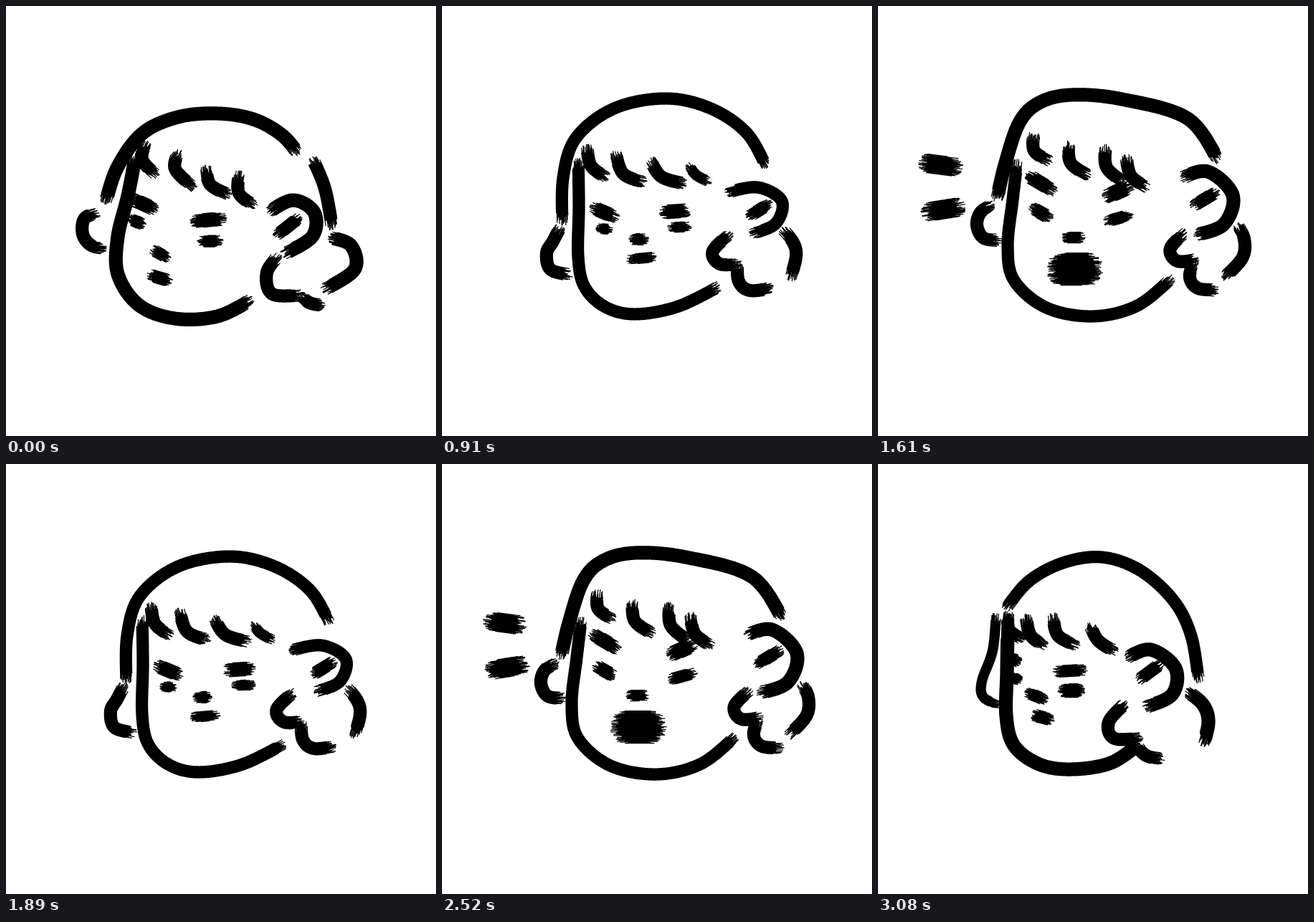
Animation of 600x600 px, one loop 3150 ms. Source, as an HTML page with a canvas:

```html
<!DOCTYPE html>
<html lang="en">
<head>
<meta charset="utf-8">
<title>Shouting girl</title>
<style>
html, body { margin: 0; width: 100%; height: 100%; overflow: hidden; background: #fff; }
canvas { display: block; }
</style>
</head>
<body>
<canvas id="stage" width="600" height="600"></canvas>
<script>
const TICK = 70, TICKS = 45;
const ctx = document.getElementById('stage').getContext('2d');

// Column order of the poses in every part
const TURN = 0, SHOUT = 1, LEAN = 2, REST = 3, WIND = 4, CLOSE = 5, AWAY = 6;

// One brush stroke: its usual width, then its points in each pose.
// An odd count of numbers starts with a width for that pose alone.
const part = (width, ...poses) => poses.map(text => {
  const pts = text.split(' ').map(Number);
  const w = pts.length % 2 ? pts.shift() : width;
  return { w, pts };
});

const parts = [
  // crown of hair
  part(19,
    '138 278 155 226 190 178 240 155 295 150 345 158 385 180 410 209',
    '165 274 177 222 197 163 225 135 270 124 340 130 432 157 477 219',
    '141 305 152 240 192 170 245 143 295 138 355 152 446 192 483 259',
    '17 168 308 169 240 187 184 240 143 312 129 375 143 425 177 454 227',
    '21 143 308 150 235 183 183 230 147 290 138 370 148 460 192 490 256',
    '17 163 303 170 222 205 160 255 134 315 132 375 156 425 193 458 241',
    '17 176 205 210 164 258 138 312 130 365 148 412 190 437 240 448 307'),
  // back of hair
  part(0,
    '18 426 209 445 255 456 314', '476 217 480 240 484 260', '482 257 486 270 488 285',
    '453 224 456 240 458 260', '489 254 490 265 490 280', '457 240 460 250 462 262',
    '437 240 445 270 448 305'),
  // lock behind the cheek
  part(18,
    '132 288 110 296 107 318 119 334 141 338',
    '164 276 144 287 138 306 148 324 174 327',
    '141 298 130 318 127 338 135 352 153 358',
    '167 305 155 328 146 345 152 368 184 376',
    '143 295 143 312 126 330 119 345 127 364',
    '17 163 298 153 315 147 330 152 349 174 356',
    '14 165 207 160 260 145 303 147 325 171 338'),
  // face
  part(19,
    '182 203 170 265 156 322 156 374 185 417 235 436 295 433 346 408',
    '17 195 212 188 270 181 335 190 383 235 421 300 433 362 418 413 377',
    '192 215 176 262 176 320 158 368 178 422 230 449 300 448 376 421',
    '17 190 210 191 280 190 350 199 392 228 420 270 430 330 419 391 389',
    '191 210 174 270 168 328 155 385 182 432 240 454 315 452 388 412',
    '17 197 220 190 285 187 350 203 397 245 425 300 432 352 418 397 387',
    '181 223 180 290 179 352 190 393 225 419 270 426 325 417 368 388'),
  // fringe
  part(18,
    '197 187 190 214 213 239', '218 174 218 202 244 219', '225 183 213 209 229 234',
    '202 192 208 223 234 242', '226 182 219 206 226 230', '220 183 216 213 241 231',
    '182 204 183 231 206 247'),
  part(18,
    '243 200 236 227 265 256', '266 187 269 219 298 239', '263 210 259 236 281 255',
    '241 200 253 234 287 247', '16 259 215 261 236 273 254', '250 193 256 232 294 244',
    '206 208 213 239 237 256'),
  part(18,
    '279 221 285 249 315 265', '318 192 319 225 347 249', '322 221 314 246 338 269',
    '289 211 306 238 343 249', '316 221 307 244 330 268', '301 203 305 232 332 245',
    '244 207 251 239 282 255'),
  part(18,
    '326 229 325 261 350 281', '346 206 353 237 380 256', '345 231 352 259 381 269',
    '15 342 219 355 236 377 247', '346 230 352 257 382 270', '341 220 353 247 379 257',
    '294 219 307 246 335 264'),
  // brows
  part(20, '171 267 213 286', '205 234 250 261', '198 270 243 298', '205 279 248 297',
    '22 199 275 249 298', '22 202 265 250 287', '18 178 268 201 278'),
  part(20, '256 301 309 296', '22 313 269 357 249', '305 299 356 284', '302 288 349 285',
    '21 303 301 358 279', '23 297 290 358 275', '17 243 290 293 287'),
  // eyes
  part(18, '170 295 195 307', '19 210 279 244 298', '196 316 239 327', '15 214 310 239 312',
    '20 195 317 236 323', '20 207 310 245 311', '16 181 296 202 303'),
  part(17, '266 328 304 328', '314 302 357 290', '18 316 328 355 322', '15 314 309 349 308',
    '20 304 325 348 319', '20 311 316 351 314', '20 250 316 290 316'),
  // nose
  part(17, '201 338 230 354', '16 255 323 290 323', '246 349 278 366', '260 326 289 325',
    '242 350 280 360', '256 326 288 326', '204 317 238 331'),
  // mouth
  part(20, '18 196 374 233 385', '46 234 367 315 367', '21 239 385 295 384', '15 256 354 300 350',
    '239 383 285 383', '19 255 362 300 361', '18 212 349 247 358'),
  // ear
  part(19,
    '364 289 400 271 430 288 427 322 384 348', '420 241 460 231 495 264 482 305 438 321',
    '420 267 450 259 480 290 470 325 428 344', '17 394 261 440 253 474 272 465 304 428 319',
    '412 267 448 259 475 290 467 330 428 345', '18 392 272 432 250 475 275 466 310 420 320',
    '344 272 380 259 415 285 410 322 368 341'),
  part(18, '374 323 413 292', '435 282 478 256', '418 314 456 283', '424 296 462 273',
    '419 313 459 284', '419 300 457 274', '359 305 398 276'),
  // bun
  part(18,
    '383 345 364 372 372 402 418 403', '432 313 408 338 418 356 450 353',
    '430 345 409 378 411 402 440 404', '405 315 378 342 388 360 419 359',
    '424 349 408 382 414 406 443 416', '399 326 376 346 384 366 416 372',
    '348 331 322 360 330 383 371 382'),
  part(18,
    '408 401 420 412 430 416 446 418', '442 352 435 378 447 394 478 396',
    '437 385 453 400 468 404 490 402', '412 356 414 384 430 397 464 393',
    '441 378 455 396 470 402 494 404', '404 373 412 392 430 404 460 405',
    '358 387 368 402 380 409 401 412'),
  part(19,
    '448 322 481 334 486 368 440 398', '18 499 302 511 325 508 352 480 382',
    '510 295 526 325 524 355 502 391', '18 473 309 490 330 494 350 485 384',
    '494 296 516 325 517 355 488 397', '476 315 490 340 492 360 480 390',
    '428 315 453 335 461 360 453 395'),
  // shout marks
  part(0, '115 228 130 230', '27 56 218 119 226', '115 228 130 230', '34 222 45 222',
    '115 228 130 230', '17 35 222 59 222', '34 222 45 222'),
  part(0, '118 280 132 278', '27 59 289 123 279', '118 280 132 278', '40 287 50 287',
    '118 280 132 278', '15 41 287 64 287', '40 287 50 287')
];

const keys = [
  [0, TURN], [3, WIND], [4, LEAN], [7, SHOUT], [9, SHOUT], [12, CLOSE], [13, REST], [16, AWAY],
  [17, TURN], [18, LEAN], [21, SHOUT], [23, SHOUT], [26, CLOSE], [27, REST], [30, AWAY],
  [31, TURN], [32, WIND], [34, LEAN], [36, SHOUT], [37, SHOUT], [40, CLOSE], [41, REST], [44, AWAY],
  [45, TURN]
];
const held = [1, 5, 19, 29, 33, 43];   // ticks that keep the drawing before them

const mix = (a, b, u) => a + (b - a) * u;

function randomFrom(seed) {
  return () => {
    seed = (seed * 1664525 + 1013904223) >>> 0;
    return seed / 4294967296;
  };
}

// Catmull-Rom curve through the points, each sample with normal and distance
function trace(pts) {
  const n = pts.length / 2, out = [];
  const at = (i, c) => pts[2 * Math.max(0, Math.min(n - 1, i)) + c];
  let len = 0;
  for (let i = 0; i < n - 1; i++) {
    for (let j = i ? 1 : 0; j <= 40; j++) {
      const u = j / 40, pos = [], dir = [];
      for (const c of [0, 1]) {
        const p = at(i, c), q = at(i + 1, c);
        const m = (q - at(i - 1, c)) / 2, k = (at(i + 2, c) - p) / 2;
        const a = 2 * p - 2 * q + m + k, b = 3 * q - 3 * p - 2 * m - k;
        pos[c] = ((a * u + b) * u + m) * u + p;
        dir[c] = (3 * a * u + 2 * b) * u + m;
      }
      const [x, y] = pos, d = Math.hypot(...dir) || 1;
      if (out.length) {
        const last = out[out.length - 1];
        len += Math.hypot(x - last.x, y - last.y);
      }
      out.push({ x, y, nx: -dir[1] / d, ny: dir[0] / d, s: len });
    }
  }
  return { line: out, len };
}

// A stroke is a bundle of bristles with ragged ends
function brush(pts, w, rnd) {
  if (w < 2) return;
  const { line, len } = trace(pts);
  const count = Math.ceil(w / 0.85), fray = Math.min(13, len * 0.22);
  ctx.beginPath();
  for (let i = 0; i <= count; i++) {
    const q = 2 * i / count - 1, off = q * (w - 1) / 2;
    const round = (1 - Math.sqrt(1 - q * q)) * Math.min(w * 0.4, len * 0.3);
    const from = round + fray * rnd() ** 1.4;
    const to = len - round - fray * rnd() ** 1.4;
    let open = false;
    for (const p of line) {
      if (p.s < from || p.s > to) continue;
      const x = p.x + p.nx * off, y = p.y + p.ny * off;
      if (open) ctx.lineTo(x, y); else ctx.moveTo(x, y);
      open = true;
    }
  }
  ctx.stroke();
}

function draw(tick) {
  const i = keys.findIndex(k => k[0] > tick);
  const [t0, a] = keys[i - 1], [t1, b] = keys[i];
  const u = (tick - t0) / (t1 - t0);
  ctx.fillStyle = '#fff';
  ctx.fillRect(0, 0, 600, 600);
  ctx.strokeStyle = '#000';
  ctx.lineWidth = 1.25;
  ctx.lineJoin = 'round';
  parts.forEach((poses, n) => {
    const p = poses[a], q = poses[b];
    const pts = p.pts.map((v, j) => mix(v, q.pts[j], u));
    brush(pts, mix(p.w, q.w, u), randomFrom(n * 7919 + tick * 104729 + 1));
  });
}

let shown = -1;
function frame() {
  let tick = Math.floor(performance.now() / TICK) % TICKS;
  if (held.includes(tick)) tick--;
  if (tick !== shown) draw(shown = tick);
  requestAnimationFrame(frame);
}
frame();
</script>
</body>
</html>
```
